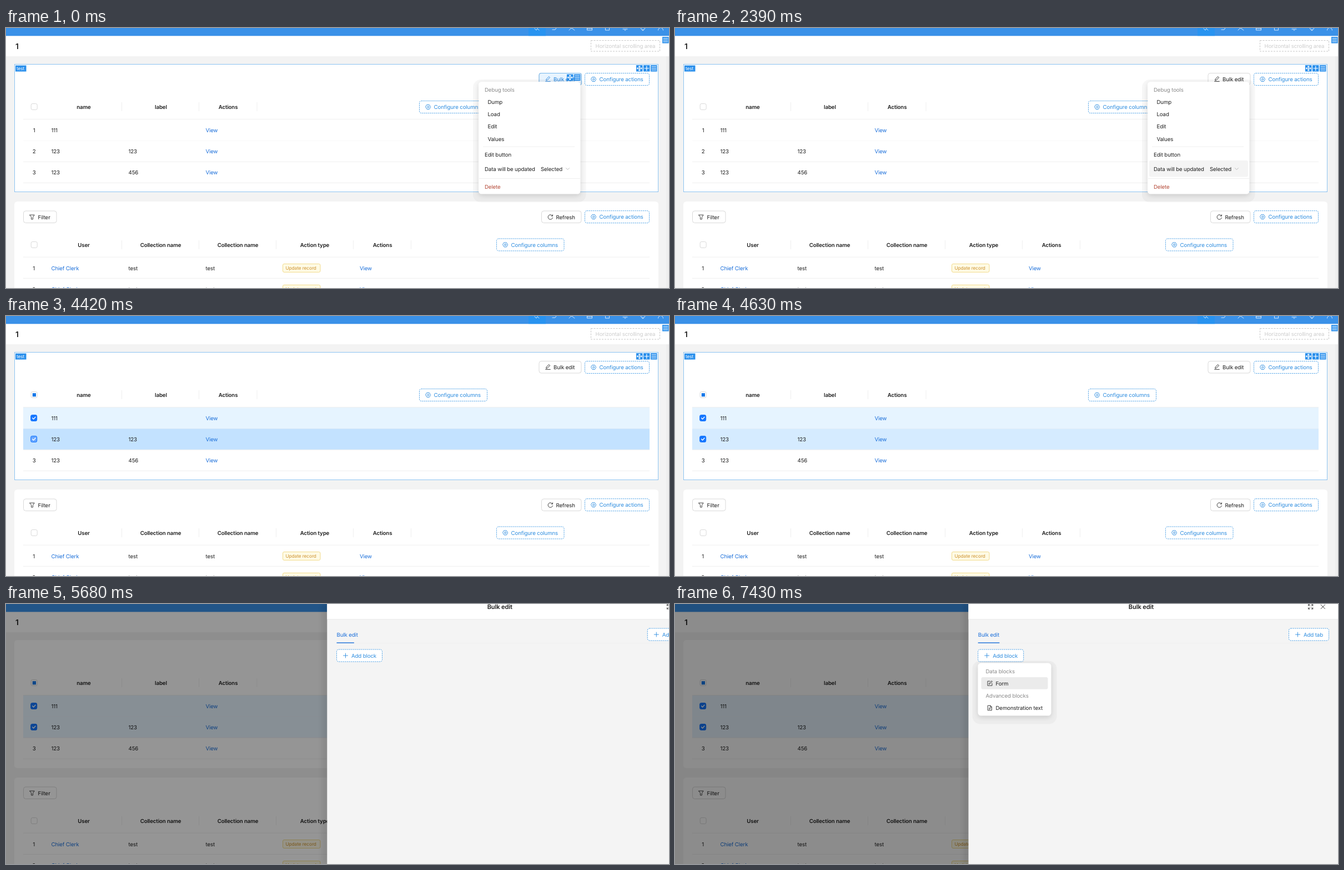
Recreate the animation shown at these times as an HTML page. Size 1194 by 469 pixels, loop 8000 ms.

```html
<!DOCTYPE html>
<html lang="en">
<head>
<meta charset="utf-8">
<title>Bulk edit</title>
<style>
html, body { margin: 0; height: 100%; overflow: hidden; background: #f3f3f3; }
svg { display: block; width: 100vw; height: 100vh; }
text { font: 9.7px Inter, "Liberation Sans", sans-serif; letter-spacing: -.13px; fill: #1f1f1f; text-rendering: geometricPrecision; }
.b { font-weight: 600; }
.mid { text-anchor: middle; }
.grey { fill: #8a8a8a; }
.pale { fill: #cdcdcd; }
.link { fill: #1b6fda; }
.act { fill: #2c8cdf; }
.red { fill: #b54a38; }
.white { fill: #fff; }
.small { font-size: 8.33px; letter-spacing: -.1px; }
.tag { fill: #cf9432; }
.title { font-size: 11.1px; }
.head { font-size: 13.9px; }
.ic { fill: none; stroke: #2b2b2b; stroke-width: .9; stroke-linecap: round; stroke-linejoin: round; }
.blue { stroke: #2c8cdf; }
.light { stroke: #fff; }
</style>
</head>
<body>
<svg id="stage" viewBox="0 0 1194 469"></svg>
<script>
const BLUE = '#2a8fec', CHECK = '#1677ff', LINE = '#efefef';

const text = (x, cy, s, cls = '', dy = 3.5) => `<text x="${x}" y="${cy + dy}" class="${cls}">${s}</text>`;
const rect = (x, y, w, h, fill, more = '') => `<rect x="${x}" y="${y}" width="${w}" height="${h}" fill="${fill}" ${more}/>`;
const path = (x, y, d, cls = '', more = '') => `<path transform="translate(${x} ${y})" class="ic ${cls}" d="${d}" ${more}/>`;
const group = (id, body) => `<g id="${id}">${body}</g>`;
const rule = (y, x1 = 31, x2 = 1159) => rect(x1, y, x2 - x1, 1, LINE);
const box = (x, y, w, h) => rect(x, y, w, h, '#fff', 'rx="4" stroke="#d9d9d9"');
const dashed = (x, y, w, h) => rect(x, y, w, h, '#fff', 'rx="3.5" stroke="#5aa8e8" stroke-dasharray="2.4 1.2"');

const ICON = {
  gear: 'M-2.1 -4h4.2l2.4 4l-2.4 4h-4.2l-2.4-4zM1.6 0a1.6 1.6 0 1 0-3.2 0a1.6 1.6 0 1 0 3.2 0',
  pencil: 'M-4.3 4.4h8.6M-3.2 2.2l.4-2.2l4.6-4.4l1.8 1.8l-4.6 4.4z',
  funnel: 'M-4.2 -3.8h8.4l-2.8 4v3.8h-2.8v-3.8z',
  reload: 'M3.6 -2.2a4.3 4.3 0 1 0 .5 3.4M4 -4.2v2.3h-2.3',
  plus: 'M-4 0h8M0 -4v8',
  cross: 'M-3.6 -3.6l7.2 7.2M3.6 -3.6l-7.2 7.2',
  expand: 'M-1.3 -1.3l-2.7-2.7m0 2.4v-2.4h2.4M1.3 -1.3l2.7-2.7m0 2.4v-2.4h-2.4M-1.3 1.3l-2.7 2.7m0-2.4v2.4h2.4M1.3 1.3l2.7 2.7m0-2.4v2.4h-2.4',
  form: 'M0 -3.8h-4v8h8v-4M-1.4 1.4l.3-1.6l4.2-4.2l1.3 1.3l-4.2 4.2z',
  file: 'M-3.4 -4.3h4.4l2.4 2.4v6.2h-6.8zM.8 -4.2v2.5h2.4M-1.6 .3h3.2M-1.6 2.2h2',
  down: 'M-3 -1.4l3 3l3-3',
  tick: 'M-2.6 0l2 2l3.4-3.8',
  move: 'M-4 0h8M0 -4v8M-1.2 -3l1.2-1.2l1.2 1.2M-1.2 3l1.2 1.2l1.2-1.2M-3 -1.2l-1.2 1.2l1.2 1.2M3 -1.2l1.2 1.2l-1.2 1.2',
  bars: 'M-4 -3h8M-4 0h8M-4 3h8'
};
const handle = (x, y, icon) => rect(x, y, 11.5, 11.5, BLUE) + path(x + 5.75, y + 5.75, ICON[icon], 'light', 'style="stroke-width:1.2"');
const configure = (x, cy, w, what) =>
  dashed(x, cy - 11, w, 22) + path(x + 15.7, cy, ICON.gear, 'blue') + text(x + 26, cy, 'Configure ' + what, 'act');
const add = (x, cy, w, what) =>
  dashed(x, cy - 11, w, 22) + path(x + 16, cy, ICON.plus, 'blue') + text(x + 26.5, cy, 'Add ' + what, 'act');
const emptyBox = (x, cy, more = '') => rect(x - 5.5, cy - 5.5, 11, 11, '#fff', `rx="2.6" stroke="#d9d9d9" ${more}`);
const popup = (x, y, w, h) =>
  rect(x - 10, y - 4, w + 20, h + 19, '#000', 'rx="14" opacity=".032"') +
  rect(x, y + 3, w, h, '#000', 'rx="6" opacity=".13" style="filter:blur(4px)"') +
  rect(x, y, w, h, '#fff', 'rx="5.5"');

function tableHead(cy, names, stops) {
  return emptyBox(50.7, cy) +
    names.map(([x, s]) => text(x, cy, s, 'b mid')).join('') +
    stops.map(x => rect(x, cy - 8, 1, 16, LINE)).join('');
}

const topIcons = [956, 988, 1019, 1051, 1083, 1115, 1147, 1179].map((x, i) =>
  path(x, 0, ['M-4 1l3 3l2-3l3 3', 'M-4 3h5l2-3', 'M-5 4l4-4l2 1l4 3', 'M-4.5 0v4h9v-4M-4.5 1h9',
    'M-3.5 0v4h7v-4', 'M-4 2h8M-1 4h2', 'M-4 0l2 3h4l2-3M-1 4.4h2', 'M-4.5 4a4.5 4.5 0 0 1 9 0'][i], 'light', 'opacity=".85"')).join('');

const blockRows = [['1', '111', ''], ['2', '123', '123'], ['3', '123', '456']].map(([n, name, label], i) => {
  const cy = 184 + 38 * i, top = 165 + 38.3 * i;
  const picker = i > 1 ? '' :
    group('box' + i, emptyBox(50.2, cy, `id="edge${i}"`)) +
    group('check' + i, rect(44.5, cy - 5.5, 11.4, 11, CHECK, 'rx="2.6"')) +
    group('tick' + i, path(50.2, cy, ICON.tick, 'light', 'style="stroke-width:1.4"'));
  return (i > 1 ? '' : rect(31, top, 1128, 38, '#fff', `id="row${i}"`)) +
    group('num' + i, text(50.7, cy, n, 'mid')) + picker +
    text(81.5, cy, name) + text(220.5, cy, label) + text(359.5, cy, 'View', 'link') + rule(cy + 18.8);
}).join('');

const logRow = (cy, n) => text(50.2, cy, n, 'mid') + text(81.5, cy, 'Chief Clerk', 'link') +
  text(220.5, cy, 'test') + text(359.5, cy, 'test') +
  rect(498.5, cy - 7.5, 67.5, 15, '#fefae4', 'rx="2.5" stroke="#f3dc8e"') +
  text(503.5, cy, 'Update record', 'small tag', 3) + text(637, cy, 'View', 'link');

const page =
  rect(0, 0, 1194, 469, '#f3f3f3') + rect(1189, 51, 5, 418, '#eee') +
  rect(0, 0, 1194, 14.5, '#3a91e8') + rect(941, 0, 31, 14.5, '#2893f0') + topIcons +
  rect(0, 14.5, 1194, 36.5, '#fff') + text(17, 33, '1', 'b head', 5) +
  rect(1053.5, 22.5, 124, 19.5, 'none', 'stroke="#c6c6c6" stroke-dasharray="3 2"') +
  text(1115.5, 32, 'Horizontal scrolling area', 'pale mid') +
  rect(15, 65, 1160, 231, '#fff', 'rx="5.5"') +
  tableHead(142, [[140, 'name'], [279, 'label'], [400, 'Actions']], [208, 347, 451.5]) +
  rect(47.8, 139.2, 6.2, 6.2, '#1677e8', 'id="some"') + rule(164) +
  configure(744.5, 142.5, 122, 'columns') + blockRows +
  configure(1042.5, 92.5, 116, 'actions') +
  box(960, 81.5, 76, 21.5) + path(976, 92, ICON.pencil, '', 'id="pen"') + `<g id="bulk">${text(986, 92, 'Bulk edit')}</g>` +
  group('bulkTools', rect(960, 81.5, 76.5, 21.5, '#1890ff', 'fill-opacity=".1" rx="3" stroke="#74b6ec"') +
    handle(1010, 83.5, 'move') + handle(1023, 83.5, 'bars')) +
  group('tools', rect(15.5, 65.5, 1159, 230, 'none', 'stroke="#8ec4f1"') +
    rect(17, 67.5, 19.5, 11, BLUE) + text(19, 73, 'test', 'small white', 3) +
    handle(1135, 67, 'move') + handle(1148, 67, 'plus') + handle(1161, 67, 'bars') + handle(1182, 16, 'bars')) +
  rect(15, 313, 1160, 180, '#fff', 'rx="5.5"') +
  box(31.5, 330, 59.5, 21.5) + path(47, 341, ICON.funnel) + text(57.5, 341, 'Filter') +
  box(964.5, 330, 71.5, 21.5) + path(980.5, 341, ICON.reload) + text(990.5, 341, 'Refresh') +
  configure(1042.5, 340.7, 116, 'actions') +
  tableHead(391, [[140, 'User'], [278.5, 'Collection name'], [417.5, 'Collection name'], [556, 'Action type'], [678, 'Actions']],
    [208, 347, 486, 625, 729]) +
  configure(883.5, 391, 121.5, 'columns') + rule(412.7) + logRow(433, '1') + rule(451) + logRow(471, '2');

const menu = popup(851, 97, 183.5, 202.5) + text(862, 111, 'Debug tools', 'grey') +
  ['Dump', 'Load', 'Edit', 'Values'].map((s, i) => text(867.5, 133.2 + 22.3 * i, s)).join('') +
  rule(213.5, 859, 1024) + text(862, 228.5, 'Edit button') +
  rect(854, 239, 178, 29.5, '#f4f4f4', 'rx="3" id="hoverData"') +
  text(862, 254, 'Data will be updated') + group('choice', text(963, 254, 'Selected')) +
  path(1011.5, 254, ICON.down, '', 'style="stroke:#b5b5b5"') +
  rule(271, 852, 1034) + text(862, 286, 'Delete', 'red');

const options = popup(955, 267, 66, 51) + rect(957.5, 270, 61, 22, '#e6f4ff', 'rx="2.8"') +
  text(963, 281, 'Selected', 'b') + text(963, 303.5, 'All');

const drawer =
  rect(-9, 0, 14, 469, '#000', 'opacity=".08" style="filter:blur(4px)"') +
  rect(0, 0, 680, 469, '#f4f4f4') + rect(0, 0, 680, 27, '#fff') + rect(0, 27, 680, 1, '#ececec') +
  text(311, 5, 'Bulk edit', 'b mid title', 4) +
  path(616.2, 5, ICON.expand) + path(638.3, 5, ICON.cross) +
  text(17.2, 55, 'Bulk edit', 'link') + rule(70, 17, 649.5) + rect(17.2, 69.3, 38.7, 1.4, '#1b6fda', 'id="ink"') +
  add(577, 55, 72, 'tab') +
  rect(15.2, 80.2, 85.5, 25.5, 'none', 'rx="5.5" stroke="#69b1ff" stroke-width="2.5" id="wave"') + add(17.2, 93, 82, 'block') +
  group('blocks', popup(17, 106.5, 132, 95) + text(31, 121, 'Data blocks', 'grey') +
    rect(23, 132, 120, 21.7, '#ebebeb', 'rx="3" id="hoverForm"') +
    path(38.5, 143, ICON.form) + text(49, 143, 'Form') + text(31, 165.3, 'Advanced blocks', 'grey') +
    path(38.5, 187.5, ICON.file) + text(49, 187.5, 'Demonstration text'));

stage.innerHTML = page + group('menu', menu) + group('options', options) +
  rect(0, 0, 1194, 469, '#000', 'id="mask"') + group('drawer', drawer);

const $ = id => document.getElementById(id);
const show = (id, v) => {
  $(id).setAttribute('opacity', v);
  $(id).style.display = v > 0 ? '' : 'none';
};
const mix = (a, b, p) => `color-mix(in srgb, ${b} ${p * 100}%, ${a})`;
const unfold = (id, y, p) => {
  const s = .8 + .2 * p;
  show(id, p);
  $(id).setAttribute('transform', `translate(0 ${y * (1 - s)}) scale(1 ${s})`);
};

const STEP = 70;
function draw(now) {
  const raw = now % 8000;
  const t = raw < 500 ? 0 : 500 + Math.floor((raw - 500) / STEP) * STEP;
  // rises from 0 to 1 in n steps, the first one at time a
  const fade = (a, n = 1) => Math.min(1, Math.max(0, (t - a + STEP) / (STEP * n)));
  const within = (a, b) => +(t >= a && t < b);

  show('tools', within(0, 500) + within(2390, 5610));
  show('bulkTools', within(0, 500) + within(5120, 5610));
  const tint = t < 5120 ? 1 - fade(500, 4) : fade(5190) - .35 * fade(5400, 2);
  const ink = mix('#1f1f1f', '#2580d8', tint);
  $('bulk').firstChild.style.fill = ink;
  $('pen').style.stroke = ink;

  unfold('menu', 97, 1 - fade(2460, 5));
  show('hoverData', fade(500, 4));
  const open = fade(1200, 4) - fade(1970, 4);
  unfold('options', 267, open);
  show('choice', 1 - .65 * open);

  show('some', +(t >= 3720));
  [[3160, 3720, 3860], [4000, 4420, 4560]].forEach(([enter, pick, leave], i) => {
    const picked = +(t >= pick);
    show('num' + i, +(t < enter));
    show('box' + i, +(t >= enter));
    $('edge' + i).style.stroke = mix('#d9d9d9', CHECK, fade(enter, 2));
    show('check' + i, picked * Math.min(1, .65 + (t - pick) / 400));
    show('tick' + i, picked);
    $('row' + i).style.fill = picked ? mix('#c3e2ff', '#e6f4ff', fade(leave, 4)) : '#fff';
  });

  const slide = t < 5610 ? 0 : t >= 5750 ? 1 : 1 - (1 - (t - 5480) / 300) ** 2.36;
  show('mask', .45 * slide);
  show('drawer', +(slide > 0));
  $('drawer').setAttribute('transform', `translate(${528.5 + 665.5 * (1 - slide)} 0)`);
  $('ink').setAttribute('width', 38.7 * slide ** 2.7);
  unfold('blocks', 106.5, fade(6590, 3));
  show('wave', t < 6940 ? 0 : .4 * (1 - fade(6940, 3)));
  show('hoverForm', +(t >= 7430));
}

const start = performance.now();
(function loop() {
  draw(performance.now() - start);
  requestAnimationFrame(loop);
})();
</script>
</body>
</html>
```
